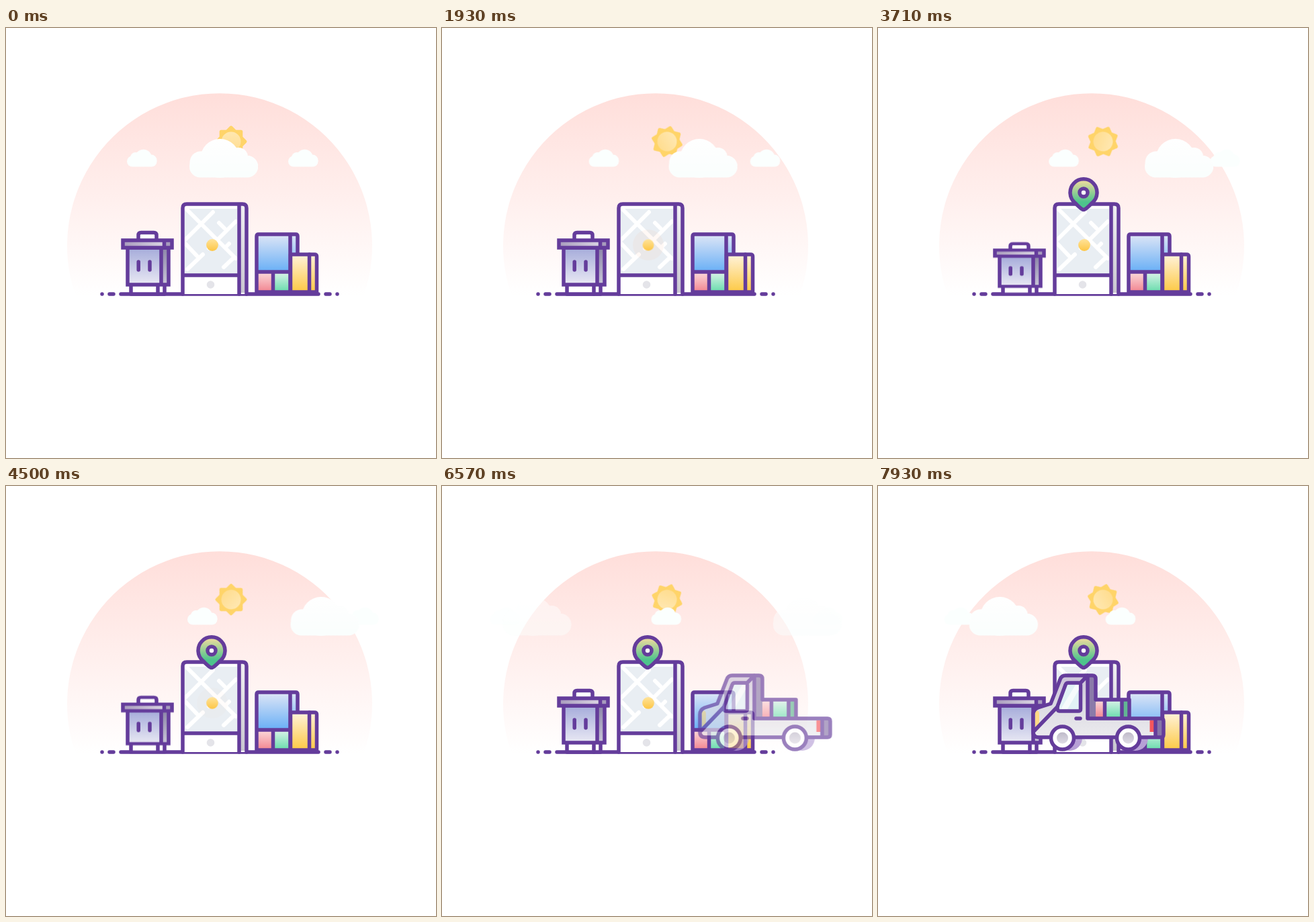
An HTML page that plays this animation: 640 px wide and 640 px high, repeating every 8000 ms.

```html
<!DOCTYPE html>
<html lang="en">
<head>
<meta charset="utf-8">
<title>Pickup scene</title>
<style>
  html, body { margin: 0; width: 100%; height: 100%; overflow: hidden; background: #fff; }
  svg { display: block; width: 100%; height: 100%; }
  .ink { stroke: #643c9b; stroke-width: 5.5; stroke-linecap: round; stroke-linejoin: round; }
  .line { fill: none; }
  .road { fill: none; stroke: #fff; stroke-width: 6; stroke-linecap: round; stroke-linejoin: round; }

  .sun, .big, .small, .out, .in, .bin, .pin, .truck { animation: 8s linear infinite; }
  .sun { transform-origin: 335px 169px; animation-name: spin; }
  .big { animation-name: drift-big; }
  .small { animation-name: drift-small; }
  .out { animation-name: fade-out; }
  .in { animation-name: fade-in; }
  .bin { transform-origin: 210px 396px; animation-name: squash; animation-timing-function: ease-in-out; }
  .pin { animation-name: drop; }
  .truck { animation-name: drive, show-truck; }
  .glow { animation: glow 4s linear infinite; }
  .dot { transform-origin: 307px 323px; animation: beat 4s ease-in-out infinite; }

  @keyframes spin { to { transform: rotate(240deg); } }
  @keyframes drift-big { to { transform: translateX(267.6px); } }
  @keyframes drift-small { to { transform: translateX(160px); } }
  @keyframes fade-out { 0%, 75% { opacity: 1; } 90%, 100% { opacity: 0; } }
  @keyframes fade-in { 0%, 75% { opacity: 0; } 90%, 100% { opacity: 1; } }
  @keyframes squash {
    0%, 37.5%, 62.5%, 100% { transform: scaleY(1); }
    50% { transform: scaleY(.78); }
  }
  @keyframes drop {
    0%, 26% { transform: translateY(-30px); opacity: 0; animation-timing-function: ease-out; }
    36%, 100% { transform: none; opacity: 1; }
  }
  @keyframes drive {
    0%, 75% { transform: translateX(183.5px); animation-timing-function: cubic-bezier(.333, .492, .667, .825); }
    100% { transform: translateX(-71.8px); }
  }
  @keyframes show-truck { 0%, 75.6% { opacity: 0; } 85.6%, 100% { opacity: 1; } }
  @keyframes glow { 0%, 8% { opacity: 0; } 36% { opacity: .13; } 60%, 100% { opacity: 0; } }
  @keyframes beat { 0%, 70%, 100% { transform: scale(1); } 42% { transform: scale(.94); } }
</style>
</head>
<body>
<svg viewBox="0 0 640 640">
  <defs>
    <linearGradient id="sky" gradientUnits="userSpaceOnUse" x1="0" y1="96" x2="0" y2="398">
      <stop stop-color="#ffdeda"/><stop offset="1" stop-color="#fff"/>
    </linearGradient>
    <linearGradient id="mist" gradientUnits="userSpaceOnUse" x1="0" y1="165" x2="0" y2="222">
      <stop stop-color="#fff"/><stop offset="1" stop-color="#fafefd"/>
    </linearGradient>
    <linearGradient id="core" x2="0" y2="1">
      <stop stop-color="#ffe7b0"/><stop offset="1" stop-color="#ffdd90"/>
    </linearGradient>
    <linearGradient id="amber" x2="0" y2="1">
      <stop stop-color="#ffe39a"/><stop offset="1" stop-color="#fdc646"/>
    </linearGradient>
    <linearGradient id="yellow" x2="0" y2="1">
      <stop stop-color="#fff3dc"/><stop offset="1" stop-color="#fdc944"/>
    </linearGradient>
    <linearGradient id="blue" x2="0" y2="1">
      <stop stop-color="#dfe6f6"/><stop offset="1" stop-color="#68aff6"/>
    </linearGradient>
    <linearGradient id="red" x2="0" y2="1">
      <stop stop-color="#fbdcdc"/><stop offset="1" stop-color="#f2838f"/>
    </linearGradient>
    <linearGradient id="green" x2="0" y2="1">
      <stop stop-color="#ddf3ea"/><stop offset="1" stop-color="#66dcab"/>
    </linearGradient>
    <linearGradient id="pinFill" x2="0" y2="1">
      <stop offset=".1" stop-color="#e2d99c"/><stop offset=".75" stop-color="#4dc48c"/>
    </linearGradient>
    <linearGradient id="binFill" x2="0" y2="1">
      <stop stop-color="#a5abda"/><stop offset="1" stop-color="#e9e9f4"/>
    </linearGradient>
    <linearGradient id="shade" x2="0" y2="1">
      <stop stop-color="#8b84a8"/><stop offset="1" stop-color="#c9c6d8"/>
    </linearGradient>
    <linearGradient id="lid">
      <stop stop-color="#a89bbd"/><stop offset="1" stop-color="#e3dfea"/>
    </linearGradient>
    <linearGradient id="edge" x2="0" y2="1">
      <stop stop-color="#f0eff3"/><stop offset="1" stop-color="#c9c7d0"/>
    </linearGradient>
    <linearGradient id="paint" x2="0" y2="1">
      <stop stop-color="#c9c0d8"/><stop offset=".55" stop-color="#dedde4"/><stop offset="1" stop-color="#ebeaee"/>
    </linearGradient>
    <linearGradient id="hub" x2="0" y2="1">
      <stop stop-color="#bfbac9"/><stop offset="1" stop-color="#dedbe5"/>
    </linearGradient>

    <g id="bigCloud" fill="url(#mist)">
      <rect x="273" y="190" width="102" height="32.5" rx="16"/>
      <circle cx="290" cy="200" r="16.5"/>
      <circle cx="318.500" cy="194" r="29"/>
      <circle cx="346" cy="192" r="14"/>
      <circle cx="359" cy="206" r="16"/>
    </g>
    <g id="smallCloud" fill="#fbfffe">
      <rect x="180" y="190.500" width="44.500" height="16" rx="8"/>
      <circle cx="193" cy="193" r="8"/>
      <circle cx="204.500" cy="193" r="12.300"/>
      <circle cx="216" cy="197" r="8.500"/>
    </g>
    <g id="wheel">
      <circle r="17" fill="#fff" class="ink"/>
      <circle r="8.500" fill="url(#hub)"/>
    </g>
  </defs>

  <path d="M103 397A227 227 0 1 1 533 397Z" fill="url(#sky)"/>

  <g class="sun" fill="#ffd469">
    <rect x="317.700" y="151.700" width="34.600" height="34.600" rx="2.500"/>
    <rect x="317.700" y="151.700" width="34.600" height="34.600" rx="2.500" transform="rotate(45 335 169)"/>
    <circle cx="335" cy="169" r="14.500" fill="url(#core)"/>
  </g>

  <g class="small">
    <use href="#smallCloud"/>
    <g class="out"><use href="#smallCloud" x="240"/></g>
    <g class="in"><use href="#smallCloud" x="-240"/></g>
  </g>
  <g class="big">
    <g class="out"><use href="#bigCloud"/></g>
    <g class="in"><use href="#bigCloud" x="-402.500"/></g>
  </g>

  <!-- ground -->
  <path class="ink line" d="M171 396H465M143 396h.01M154 396h6M476 396h6M493 396h.01"/>

  <g class="bin">
    <path d="M186 383V396H236V383" fill="#fff" class="ink"/>
    <path class="ink line" d="M226 383V396"/>
    <rect x="181" y="327" width="61" height="55" fill="url(#binFill)"/>
    <rect x="231" y="327" width="11" height="55" fill="url(#shade)"/>
    <path class="ink line" style="stroke-linejoin:miter" d="M181 327H242V382H181ZM231 327V382"/>
    <path class="ink line" d="M197.200 348V360M214 348V360"/>
    <path class="ink" fill="#fff" d="M197 315V308.500Q197 304.500 201 304.500H220Q224 304.500 224 308.500V315"/>
    <rect x="174" y="316" width="73" height="11" fill="url(#lid)"/>
    <rect x="236" y="316" width="11" height="11" fill="#a79bbd"/>
    <path class="ink line" style="stroke-linejoin:miter" d="M174 316H247V327H174ZM235.500 316V327"/>
  </g>

  <g>
    <path d="M263 396V268Q263 262 269 262H352Q358 262 358 268V396Z" fill="#fff"/>
    <rect x="266" y="269" width="78" height="97" fill="#e9eef3"/>
    <path class="road" d="M269 270L342 343M308 274L267 315M342 288L302 328M317 290L325 298M267 321L284 339M270 359L293 337M332 321L326 327M324 356L340 341"/>
    <rect x="349" y="264" width="7" height="130" fill="url(#edge)"/>
    <circle cx="304.500" cy="382" r="5.800" fill="#e4e4e9"/>
    <path class="ink line" d="M263 396V268Q263 262 269 262H352Q358 262 358 268V396M347 262V396M263 368H347"/>
    <circle class="glow" cx="307" cy="323" r="23" fill="#ff9d6b" opacity="0"/>
    <circle class="dot" cx="307" cy="323" r="8.900" fill="url(#amber)"/>
  </g>

  <g class="pin">
    <path class="ink" fill="url(#pinFill)" d="M306 270.500Q303 270.500 293 260A20 20 0 1 1 319 260Q309 270.500 306 270.500Z"/>
    <circle class="ink" cx="306" cy="245" r="6" fill="#fff"/>
  </g>

  <!-- buildings -->
  <g>
    <rect x="373" y="307" width="50" height="56" fill="url(#blue)"/>
    <rect x="423" y="307" width="11" height="56" fill="url(#blue)"/>
    <rect x="373" y="363" width="24" height="30" fill="url(#red)"/>
    <rect x="397" y="363" width="26" height="30" fill="url(#green)"/>
    <path class="ink line" d="M373 393V310Q373 307 376 307H431Q434 307 434 310V337M423 307V393M373 363H423M397.500 363V393M373 393H462"/>
    <path class="ink" fill="url(#yellow)" d="M423.500 393V337H459Q462.500 337 462.500 340V393Z"/>
    <path class="ink line" d="M451.500 337V393"/>
  </g>

  <g class="truck" opacity="0">
    <g fill="#b7a0d6">
      <circle cx="352" cy="375" r="19"/>
      <circle cx="450" cy="375" r="19"/>
    </g>
    <rect x="379" y="318" width="25" height="28" fill="url(#red)"/>
    <rect x="404" y="318" width="37" height="28" fill="url(#green)"/>
    <rect x="430" y="318" width="11" height="28" fill="#62b593"/>
    <path class="ink line" d="M379 318H441V346M404.500 318V346M430 318V346"/>
    <path d="M298 366V340Q298 333 305 330L324 324L338 288Q340 282 346 282H379V346H488Q492 346 492 350V370Q492 374 488 374H306Q298 374 298 366Z" fill="url(#paint)"/>
    <path d="M379 282H386Q391 282 391 287V346H379Z" fill="#8b7ba9"/>
    <path d="M480 346H492V374H480Z" fill="#8774a8"/>
    <rect x="471.500" y="348.500" width="7" height="17.500" fill="#f4565c"/>
    <path d="M301 335Q307 333 307 339V359Q307 364 301 364Z" fill="#ffda85"/>
    <path class="ink line" d="M298 366V340Q298 333 305 330L324 324L338 288Q340 282 346 282H386Q391 282 391 287V318M379 282V346H488Q492 346 492 350V370Q492 374 488 374H306Q298 374 298 366ZM480 346V374M362 346H368"/>
    <path class="ink" fill="#e2f2f6" d="M334 330Q334 327 336 323L346 296Q347 293 350 293H365Q368.500 293 368.500 296V332Q368.500 335 365 335H337Q334 335 334 330Z"/>
    <path d="M339 332L361 296H366V303L349 332Z" fill="#fff" opacity=".7"/>
    <use href="#wheel" x="341.500" y="375"/>
    <use href="#wheel" x="439.500" y="375"/>
  </g>
</svg>
</body>
</html>
```
